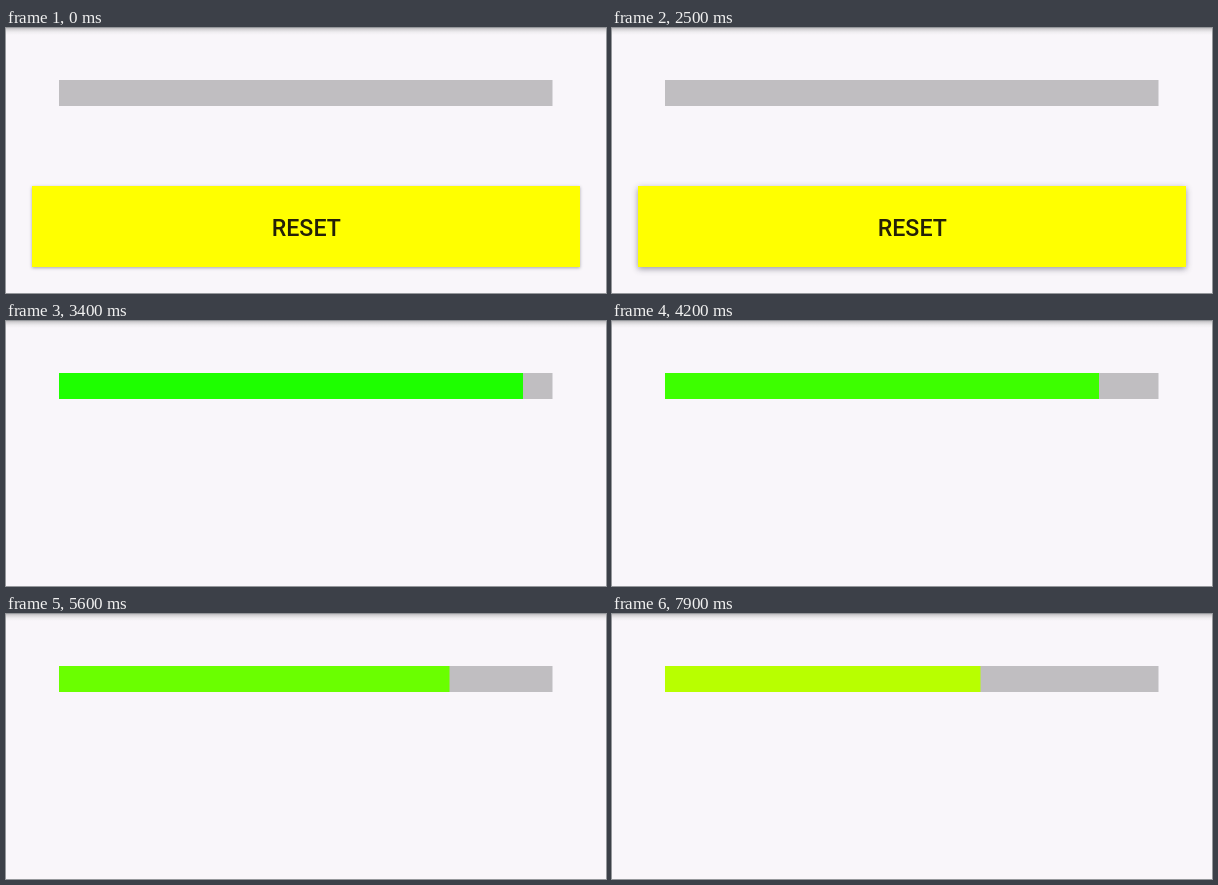
An HTML page that plays this animation: 600 px wide and 265 px high, repeating every 8 s.

```html
<!DOCTYPE html>
<html lang="en">
<head>
<meta charset="utf-8">
<title>Countdown bar</title>
<style>
html, body { margin: 0; width: 100%; height: 100%; overflow: hidden; }
body { background: #f9f6fa; }
svg { display: block; position: absolute; left: 0; top: 0; }
.header {
  position: absolute; left: 0; top: 0; width: 600px; height: 7px;
  background: linear-gradient(#bebcbf, #d9d7da 25%, #efedf0 60%, #f9f6fa);
}
.button {
  position: absolute; left: 26px; top: 157.5px; width: 547.5px; height: 81px;
  background: #ff0;
}
text { font: 500 23.2px Roboto, Arial, sans-serif; text-anchor: middle; fill: #242008; }
</style>
</head>
<body>
<div class="header"></div>
<div class="button" id="button"></div>
<svg width="600" height="265" viewBox="0 0 600 265">
  <rect x="53" y="52" width="493.5" height="26" fill="#c0bec1"/>
  <rect id="fill" x="53" y="52" width="0" height="26"/>
  <text id="label" x="300.3" y="207.6">RESET</text>
</svg>
<script>
const LOOP = 8000, STEP = 100;
const LEFT = 53, FULL = 493.5;
const PRESS = 2100, START = 2500;
const button = document.getElementById('button');
const fill = document.getElementById('fill');
const label = document.getElementById('label');

// Right edge of the bar over time; the countdown runs slightly unevenly.
const edges = [[2500, 546.5], [3400, 517], [3800, 504.5], [4200, 487],
               [4700, 474.3], [5600, 443.5], [6800, 404], [7900, 368.5]];

function edgeAt(t) {
  let i = 1;
  while (i < edges.length - 1 && t > edges[i][0]) i++;
  const [t0, x0] = edges[i - 1], [t1, x1] = edges[i];
  return x0 + (x1 - x0) * (t - t0) / (t1 - t0);
}

function draw(t) {
  const running = t > START;
  button.style.visibility = label.style.visibility = running ? 'hidden' : 'visible';
  fill.style.visibility = running ? 'visible' : 'hidden';
  if (running) {
    const width = edgeAt(t) - LEFT;
    const red = Math.round(510 * (1 - width / FULL));
    fill.setAttribute('width', width);
    fill.setAttribute('fill', `rgb(${red},255,0)`);
  } else {
    // Pressing raises the button and deepens its shadow.
    const lift = Math.min(1, Math.max(0, (t - PRESS) / 300));
    button.style.boxShadow =
      `0 ${1 + lift}px ${3 + 3 * lift}px rgba(40,40,60,${0.38 + 0.07 * lift})`;
  }
}

const begin = performance.now();
function tick() {
  const t = (performance.now() - begin) % LOOP;
  draw(Math.floor(t / STEP) * STEP);
  requestAnimationFrame(tick);
}
tick();
</script>
</body>
</html>
```
